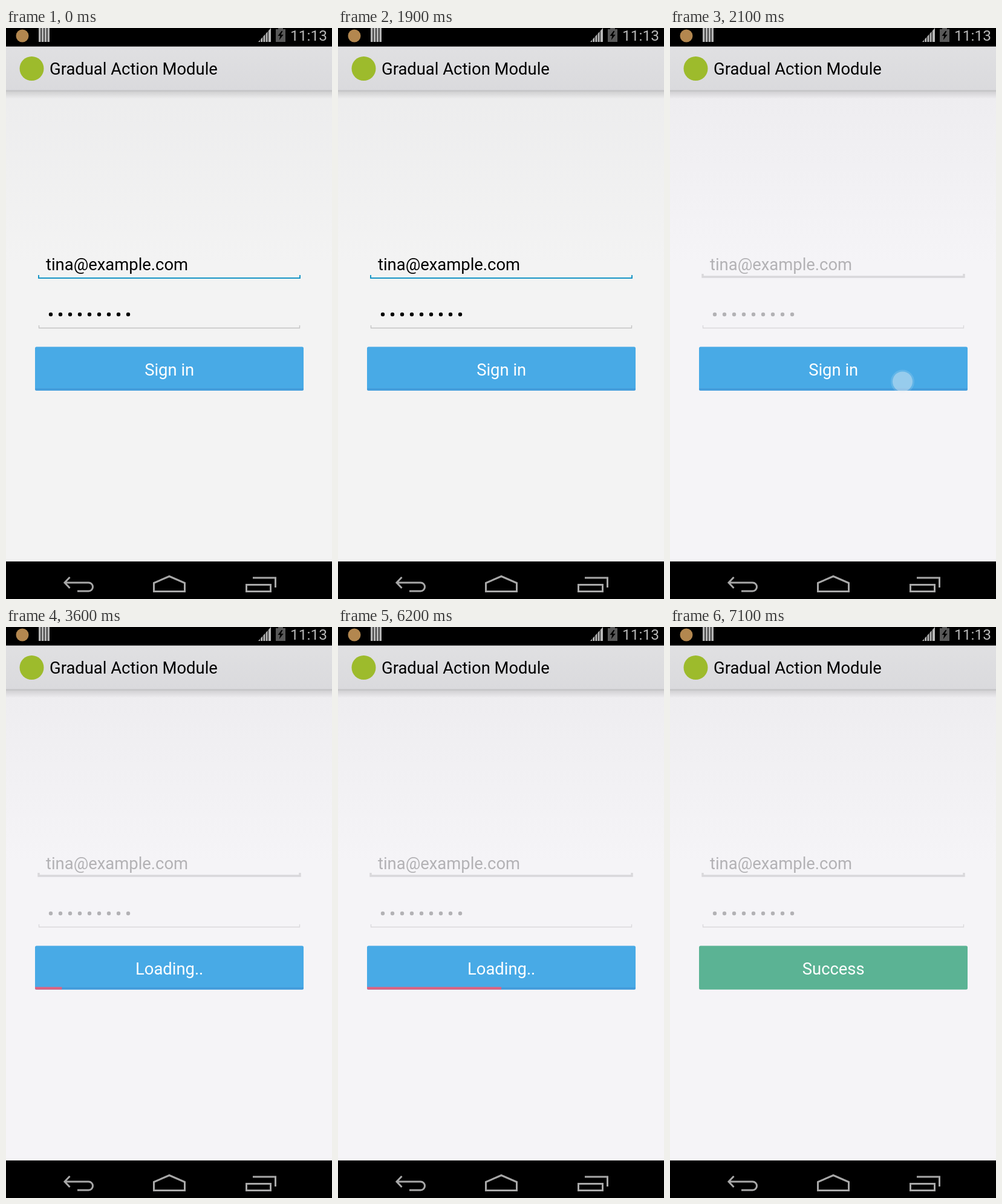
An HTML page for the animation above (8 s loop, 539 px wide and 943 px high).

```html
<!DOCTYPE html>
<html lang="en">
<head>
<meta charset="utf-8">
<title>Sign in</title>
<style>
  html, body { margin: 0; width: 100%; height: 100%; overflow: hidden; background: #000; }
  svg { display: block; width: 539px; height: 943px; }
  text { font-family: Roboto, "Noto Sans", sans-serif; font-size: 27.4px; }
  .line { fill: none; stroke: #a8a8a8; stroke-width: 3; }
</style>
</head>
<body>
<svg viewBox="0 0 539 943" xmlns="http://www.w3.org/2000/svg">
  <defs>
    <linearGradient id="page" x1="0" y1="0" x2="0" y2="1">
      <stop id="pageTop" offset="0"/>
      <stop id="pageEnd" offset=".42"/>
    </linearGradient>
    <linearGradient id="bar" x1="0" y1="0" x2="0" y2="1">
      <stop offset="0" stop-color="#e0e0e2"/>
      <stop offset="1" stop-color="#dadadd"/>
    </linearGradient>
    <linearGradient id="shade" x1="0" y1="0" x2="0" y2="1">
      <stop offset="0" stop-color="#000" stop-opacity=".12"/>
      <stop offset="1" stop-color="#000" stop-opacity="0"/>
    </linearGradient>
    <clipPath id="round"><rect x="48" y="526.5" width="444" height="72.3" rx="2.5"/></clipPath>
  </defs>

  <rect width="539" height="943"/>
  <rect y="31" width="539" height="850" fill="url(#page)"/>

  <!-- status bar -->
  <circle cx="27" cy="13" r="10.5" fill="#b3874f"/>
  <path d="M54 0h3.6v23h-3.6zM58.8 0h3.6v23h-3.6zM63.6 0h3.6v23h-3.6zM68.4 0h3.6v23h-3.6z" fill="#b4b4b4"/>
  <path d="M417 23L438 0V23Z" fill="#b8b8b8"/>
  <path d="M420.6 0v23M424.8 0v23M429 0v23M433.2 0v23" stroke="#000" stroke-width="1.2"/>
  <path d="M446 2h4v-2h8v2h4v21h-16z" fill="#585858"/>
  <path d="M455.5 5l-6 8h3.8l-1.6 7 7-9h-4.2l3-6z"/>
  <text x="470" y="21" style="font-size:24.5px" fill="#b8b8b8">11:13</text>

  <!-- action bar -->
  <rect y="30.6" width="539" height="72.4" fill="url(#bar)"/>
  <rect y="102.5" width="539" height="2.5" fill="#c5c5c7"/>
  <rect y="105" width="539" height="12" fill="url(#shade)"/>
  <circle cx="42.5" cy="67" r="20" fill="#9dbb2c"/>
  <text x="72" y="77">Gradual Action Module</text>

  <!-- form -->
  <g id="fields">
    <text x="66" y="400">tina@example.com</text>
    <g id="dots"></g>
  </g>
  <path id="mailLine" fill="none"/>
  <path id="passLine" d="M54.5 491V495.5H485.5V491" fill="none" stroke-width="1.3"/>

  <g clip-path="url(#round)">
    <rect id="face" x="48" y="526" width="444" height="73"/>
    <rect id="edge" x="48" y="595" width="444" height="4" fill="#449cdb"/>
    <rect id="fill" x="48" y="594.5" height="4.5" fill="#df6280"/>
  </g>
  <text id="label" x="270.2" y="573.5" text-anchor="middle" fill="#fff"></text>

  <g id="touch" fill="#e3edf3">
    <circle cx="384.5" cy="584" r="19.5" opacity=".16"/>
    <circle cx="384.5" cy="584" r="16.5" opacity=".42"/>
  </g>

  <!-- navigation bar -->
  <path class="line" d="M105.5 907L97 916L105.5 925M97 916H136.5a7 7 0 0 1 0 14H118"/>
  <path class="line" d="M244.5 930.5V916.5L270 905.5L295.5 916.5V930.5Z"/>
  <path class="line" d="M397.5 919.5H437.5V930.5H397.5ZM408 908H445.5V924"/>
</svg>
<script>
const LOOP = 8000, PRESS = 2000, DISABLE = 2100, RELEASE = 2200, LOAD = 3600, DONE = 7100;
// [time, progress in percent]
const STEPS = [[LOAD, 10], [4400, 20], [5200, 30], [5400, 40], [6200, 50], [6900, 60], [7000, 80], [DONE, 100]];

const $ = id => document.getElementById(id);
const set = (id, attrs) => {
  for (const k in attrs) $(id).setAttribute(k, attrs[k]);
};
const show = (id, on) => set(id, { visibility: on ? 'visible' : 'hidden' });
const underline = y => `M54 ${y - 5}V${y}H486V${y - 5}`;

$('dots').innerHTML = Array.from({ length: 9 }, (_, i) =>
  `<circle cx="${74 + 16 * i}" cy="473" r="3.2"/>`).join('');

function progress(t) {
  let p = 0;
  for (const [at, value] of STEPS) if (t >= at) p = value;
  return p;
}

function draw(t) {
  const off = t >= DISABLE, done = t >= DONE, p = progress(t);
  set('pageTop', { 'stop-color': off ? '#ecebee' : '#ebebec' });
  set('pageEnd', { 'stop-color': off ? '#f5f4f7' : '#f3f3f3' });
  set('fields', { fill: off ? '#b3b2b5' : '#000' });
  set('mailLine', off
    ? { d: underline(411), stroke: '#d9d8db', 'stroke-width': 3.4 }
    : { d: underline(413), stroke: '#1795c6', 'stroke-width': 2 });
  set('passLine', { stroke: off ? '#d9d8db' : '#c3c3c3' });
  set('face', { fill: done ? '#5bb394' : '#48aae6' });
  set('fill', { width: 4.44 * p });
  show('edge', !done);
  show('fill', !done && p > 0);
  show('touch', t >= PRESS && t < RELEASE);
  $('label').textContent = done ? 'Success' : t >= LOAD ? 'Loading..' : 'Sign in';
}

const start = performance.now();
function tick() {
  draw((performance.now() - start) % LOOP);
  requestAnimationFrame(tick);
}
draw(0);
requestAnimationFrame(tick);
</script>
</body>
</html>
```
